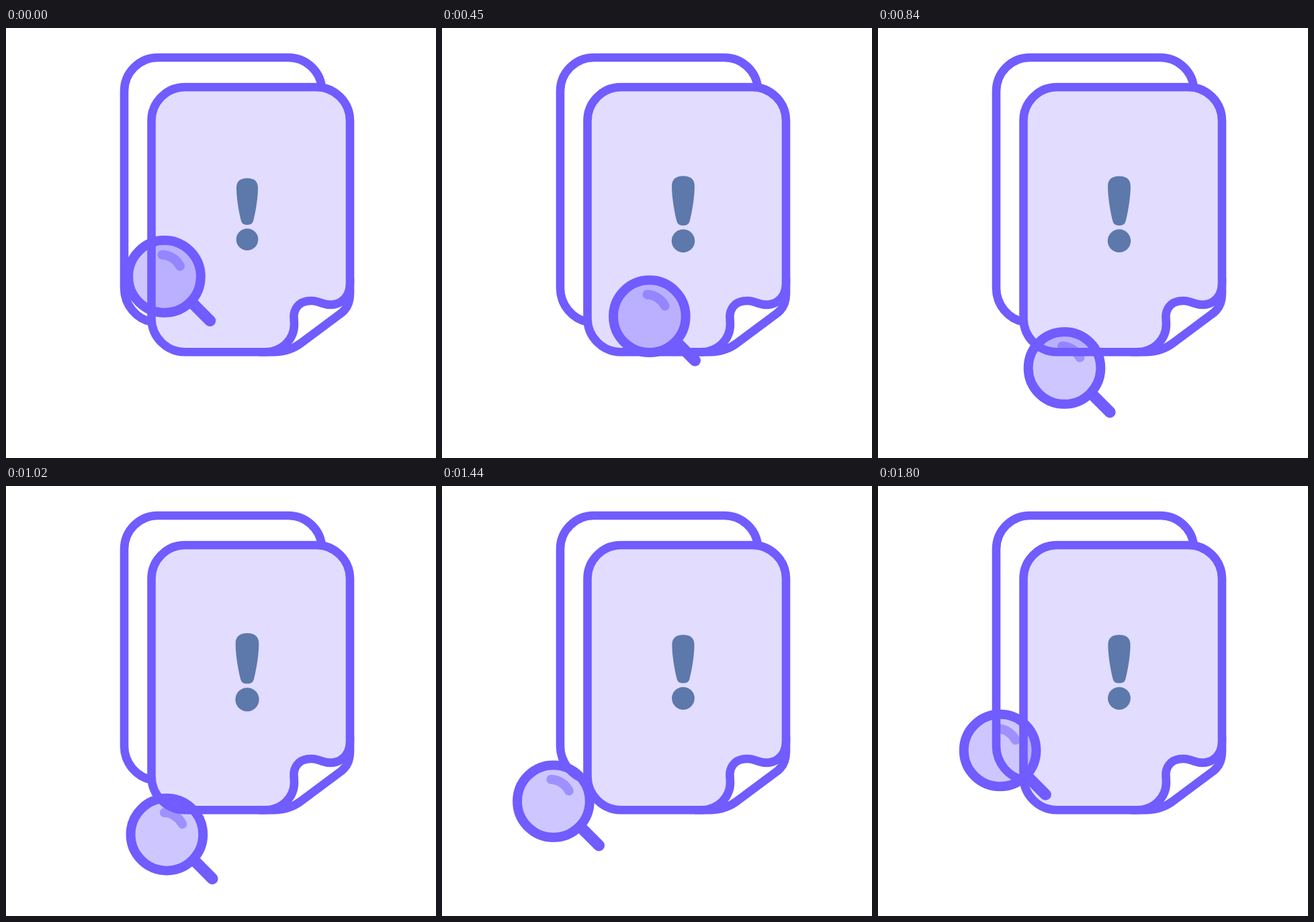
Write an HTML page that moves like this. It is 640 by 640 pixels and loops after 1830 ms.

```html
<!DOCTYPE html>
<html lang="en">
<head>
<meta charset="utf-8">
<title>Document search</title>
<style>
  html, body { margin: 0; width: 100%; height: 100%; overflow: hidden; background: #fff; }
  svg { display: block; width: 100%; height: 100%; }
</style>
</head>
<body>
<svg viewBox="0 0 640 640" fill="none" stroke="#705cff" stroke-width="12.6">
  <!-- back sheet -->
  <path d="M217 437.5C194 433 176 412 176 387V94A50 50 0 0 1 226 44H420A50 50 0 0 1 470 88"/>
  <!-- front sheet and its curled corner -->
  <path fill="#fff" d="M386 482.3H400C415 481.5 428 477.500 439 469L500 423.500C508 417 512 408 512 395V380L429 400Z"/>
  <path fill="#e2dcff" stroke-linejoin="round" d="M266.500 88H462A50 50 0 0 1 512 138V380C512 405 492 417 470 409.500C460 406 456 405.500 448 406.500C435 408.500 428 419 428.500 431L429 441C429 464 410 482.300 386 482.300H266.500A50 50 0 0 1 216.500 432.300V138A50 50 0 0 1 266.500 88Z"/>
  <g id="mark" fill="#5d78ab" stroke="none">
    <path d="M0-53.800C10.500-53.800 16-49 16-39.500C16-24 12.500-4 9.500 8C8.300 13.500 6 15.700 0 15.700S-8.300 13.500-9.500 8C-12.500-4-16-24-16-39.500C-16-49-10.500-53.800 0-53.800Z"/>
    <circle cy="37.400" r="16.300"/>
  </g>
  <g id="lens" stroke-linecap="round">
    <circle r="47" fill="#705cff" fill-opacity=".34" stroke="none"/>
    <path d="M-3.500-32.500A31 31 0 0 1 23-15.500" stroke-width="14" stroke-opacity=".5"/>
    <path d="M41 39L67.700 65.800" stroke-width="17"/>
    <circle r="53.800" stroke-width="14"/>
  </g>
</svg>
<script>
  const LOOP = 1830, STEP = 30, TURN = 2070, PULSE = 648, TAU = Math.PI * 2;
  const mark = document.getElementById('mark');
  const lens = document.getElementById('lens');

  function draw(now) {
    const t = Math.floor(now % LOOP / STEP) * STEP;
    const a = TAU * t / TURN;
    const x = 236 + 74.4 * Math.sin(a);
    const y = 444.3 - 74.4 * Math.cos(a);
    const size = 1 + 0.044 * (1 - Math.cos(TAU * t / PULSE));
    lens.setAttribute('transform', `translate(${x} ${y})`);
    mark.setAttribute('transform', `translate(359 277.3) scale(${size})`);
  }

  let start;
  function tick(now) {
    start ??= now;
    draw(now - start);
    requestAnimationFrame(tick);
  }
  draw(0);
  requestAnimationFrame(tick);
</script>
</body>
</html>
```
